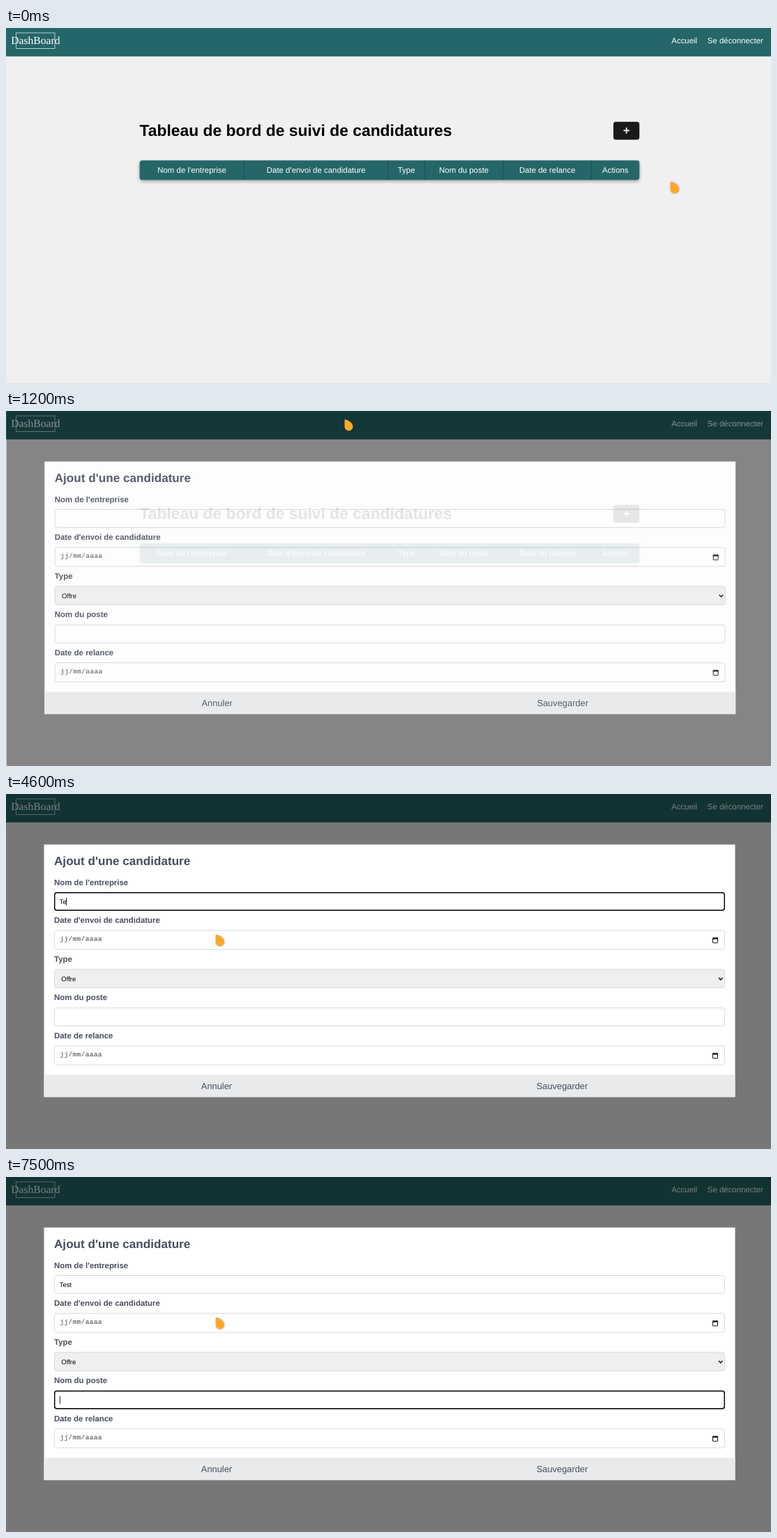
These frames come from a looping animation (1097x510 px, 8 s). An HTML page:

```html
<!DOCTYPE html>
<html lang="fr">
<head>
<meta charset="utf-8">
<title>Suivi de candidatures</title>
<style>
  html, body { margin: 0; width: 100%; height: 100%; overflow: hidden; background: #f0f0f0; }
  svg { display: block; width: 1097px; height: 510px; font-family: "Liberation Sans", Arial, sans-serif; }
  text { white-space: pre; text-rendering: geometricPrecision; }
  .mid { text-anchor: middle; }
  .bold { font-weight: bold; }
  .mono { font-family: "Liberation Mono", monospace; letter-spacing: .33px; }
  .serif { font-family: "Liberation Serif", serif; }
</style>
</head>
<body>
<svg id="stage" viewBox="0 0 1097 510"></svg>
<script>
const LOOP = 8000, STEP = 100;
const REM = 11.43, SMALL = 9.52;
const TEAL = '#256668', SLATE = '#474e5d';

const text = (x, y, str, size, fill, cls = '') =>
  `<text x="${x}" y="${y}" font-size="${size}" fill="${fill}" class="${cls}">${str}</text>`;
const rect = (x, y, w, h, fill, attrs = '') =>
  `<rect x="${x}" y="${y}" width="${w}" height="${h}" fill="${fill}" ${attrs}/>`;

// Dashboard page
const edges = [191.7, 341.5, 548, 600.3, 713, 839.4, 908.3];
const columns = ["Nom de l'entreprise", "Date d'envoi de candidature", 'Type',
  'Nom du poste', 'Date de relance', 'Actions'];
const page = rect(0, 0, 1097, 510, '#f0f0f0') +
  rect(0, 0, 1097, 40.8, TEAL) +
  rect(14.5, 7, 55.5, 22.5, 'none', 'stroke="#fff" stroke-opacity=".75" stroke-width=".9"') +
  text(7.3, 22.6, 'DashBoard', 15.6, '#fff', 'serif') +
  text(954.3, 21.8, 'Accueil', REM, '#fff') +
  text(1005.8, 21.8, 'Se déconnecter', REM, '#fff') +
  text(191.5, 154.8, 'Tableau de bord de suivi de candidatures', 2 * REM, '#000', 'bold') +
  rect(871, 134.8, 37.3, 25.6, '#1a1a1a', 'rx="3.6"') +
  text(889.7, 152.6, '+', 1.5 * REM, '#faebe0', 'bold mid') +
  rect(191.7, 190.2, 716.6, 28, TEAL, 'rx="3.6" style="filter:drop-shadow(0 2px 2.5px rgba(0,0,0,.35))"') +
  columns.map((name, i) =>
    (i ? rect(edges[i] - .5, 190.2, 1, 28, '#1c5355') : '') +
    text((edges[i] + edges[i + 1]) / 2, 207.6, name, REM, '#fff', 'mid')).join('');

// Form dialog: fields stacked with a constant gap
const fields = [
  { label: "Nom de l'entreprise", h: 26.7, fill: '#fff' },
  { label: "Date d'envoi de candidature", h: 28.2, fill: '#fff', date: true },
  { label: 'Type', h: 27.5, fill: '#efefef' },
  { label: 'Nom du poste', h: 26.7, fill: '#fff' },
  { label: 'Date de relance', h: 28.2, fill: '#fff', date: true }
];
let top_ = 141;
for (const f of fields) {
  f.y = top_;
  top_ += f.h + 27.8;
}

const box = ({ y, h }, fill, stroke, w) =>
  rect(69 + w / 2, y + w / 2, 962 - w, h - w, fill, `rx="3.2" stroke="${stroke}" stroke-width="${w}"`);

const DATE_X = 77.4, DATE_CHAR = SMALL * .6 + .33;
const dateField = ({ y }) =>
  text(DATE_X, y + 15.6, 'jj/mm/aaaa', SMALL, '#444', 'mono') +
  `<g transform="translate(1013 ${y + 10.3})">` +
  rect(.5, 1.3, 7, 6.8, 'none', 'rx=".6" stroke="#111"') + rect(0, .8, 8, 2, '#111') +
  rect(1.5, 0, 1, 1.5, '#111') + rect(5.5, 0, 1, 1.5, '#111') + '</g>';

const form = rect(54.5, 72.6, 991, 362.7, '#fff') +
  rect(54.5, 403.4, 991, 31.9, '#e9eaec') +
  text(69, 102, "Ajout d'une candidature", 1.5 * REM, SLATE, 'bold') +
  text(302, 423.8, 'Annuler', 12.86, SLATE, 'mid') +
  text(797.5, 423.8, 'Sauvegarder', 12.86, SLATE, 'mid') +
  fields.map(f =>
    text(69, f.y - 10.4, f.label, REM, SLATE, 'bold') +
    box(f, f.fill, '#d2d4d6', .9) + (f.date ? dateField(f) : '')).join('') +
  text(79.3, 268.5, 'Offre', SMALL, '#000') +
  '<path d="M1022 264l2.8 3 2.8-3" fill="none" stroke="#111" stroke-width="1.5"/>';

const byId = id => document.getElementById(id);
byId('stage').innerHTML = page +
  `<g id="dialog">${rect(0, 0, 1097, 510, '#000', 'opacity=".5"')}${form}<g id="live"></g></g>` +
  `<path id="pointer" d="M0 1.2Q0 0 1.2 .3C5.8 1.4 12 5 12 10.6A6 6 0 0 1 0 10.6Z" fill="#fea726"
    style="filter:drop-shadow(0 .6px .8px rgba(0,0,0,.45))"/>`;
const [dialog, live, pointer] = ['dialog', 'live', 'pointer'].map(byId);

// Pointer waypoints [time, x, y], joined by straight moves
const path = [
  [0, 953, 221], [400, 916, 74], [600, 851, 112], [900, 885, 137], [1000, 885, 137],
  [1100, 854.5, 141], [1200, 485.5, 12], [1700, 300, 195], [1900, 300, 195], [2000, 288, 147],
  [2100, 288, 147], [2200, 340, 216], [2700, 340, 216], [2800, 475, 229], [3200, 301, 202]
];
function pointerAt(t) {
  const next = path.findIndex(k => k[0] > t);
  if (next < 0) return path.at(-1).slice(1);
  const [a, b] = [path[next - 1], path[next]];
  const u = (t - a[0]) / (b[0] - a[0]);
  return [1, 2].map(i => a[i] + (b[i] - a[i]) * u);
}

// Click, four letters, then tabs through the date parts and fields
const inputs = [2000, 4000, 4600, 4900, 5100, 6200, 6500, 6800, 7100, 7500];
const dateParts = [['jj', 0], ['mm', 3], ['aaaa', 6]];
const caretX = n => 77 + [...'Test'].slice(0, n).length * 4.6;

function liveParts(t) {
  const done = inputs.filter(time => time <= t).length;
  if (!done) return '';
  const typed = Math.min(done - 1, 4), tabs = Math.max(done - 5, 0);
  const focus = tabs === 0 ? 0 : Math.max(1, tabs - 2);
  const blinkOn = (t - inputs[done - 1]) % 1200 < 600;
  let out = text(76.8, 157.9, 'Test'.slice(0, typed), SMALL, '#000') +
    box(fields[focus], 'none', '#000', 1.43);
  if (focus === 1) {
    const [str, i] = dateParts[tabs - 1], x = DATE_X + i * DATE_CHAR;
    out += rect(x - .3, 204, str.length * DATE_CHAR + .6, 11.6, '#1e90ff') +
      text(x, fields[1].y + 15.6, str, SMALL, '#fff', 'mono');
  } else if (focus !== 2 && blinkOn) {
    out += rect(focus ? 76.8 : caretX(typed), fields[focus].y + 8, .9, 11, '#000');
  }
  return out;
}

let shown;
function draw(now) {
  const t = Math.floor(now % LOOP / STEP) * STEP;
  const u = Math.min(1, Math.max(0, (t - 985) / 320));
  const p = 1 - (1 - u) ** 2;
  dialog.setAttribute('opacity', p);
  dialog.setAttribute('transform', `translate(${6.6 * (1 - p)} 0)`);
  pointer.setAttribute('transform', `translate(${pointerAt(t)})`);
  const parts = liveParts(t);
  if (parts !== shown) live.innerHTML = shown = parts;
  requestAnimationFrame(draw);
}
draw(performance.now());
</script>
</body>
</html>
```
